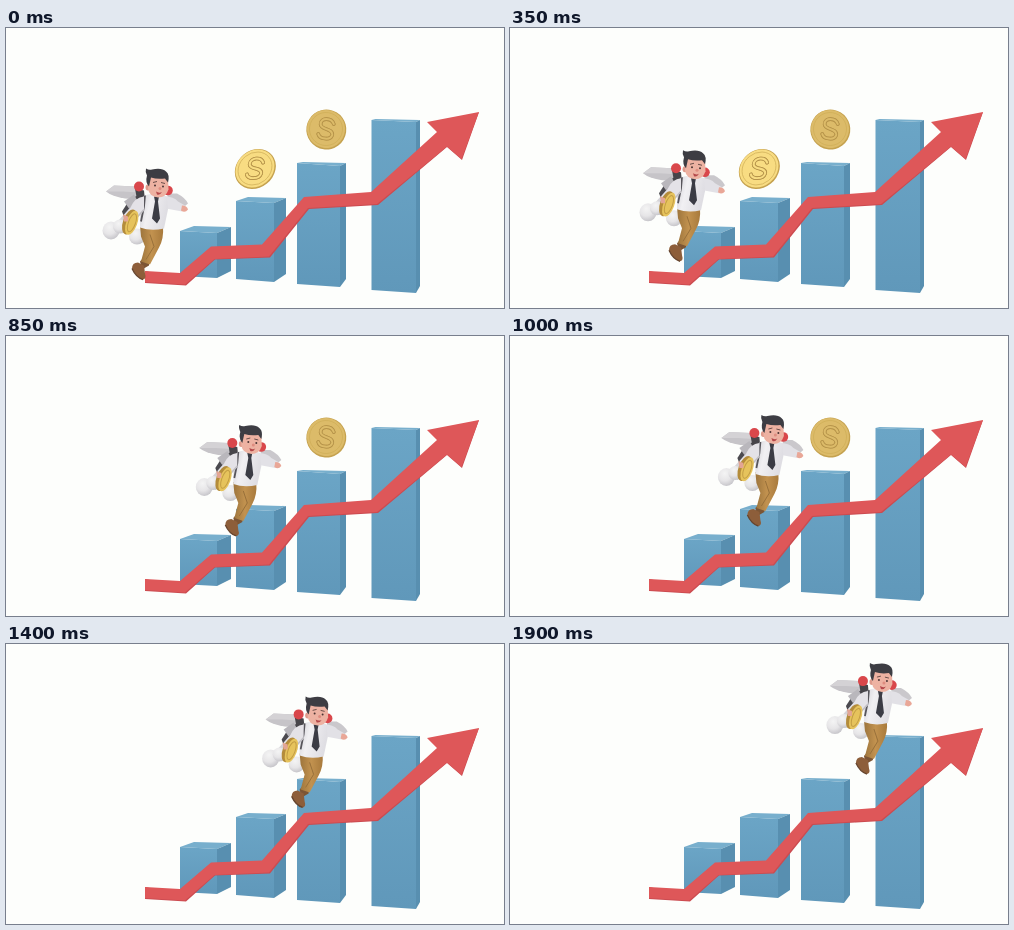
An HTML page that plays this animation: 498 by 280 pixels, repeating every 1950 ms.

```html
<!DOCTYPE html>
<html lang="en">
<head>
<meta charset="utf-8">
<title>Climbing the chart</title>
<style>
  html, body { margin: 0; width: 100%; height: 100%; overflow: hidden; background: #fdfefc; }
  svg { display: block; width: 498px; height: 280px; }
</style>
</head>
<body>
<svg viewBox="0 0 498 280">
  <defs>
    <linearGradient id="front" x2="0" y2="1">
      <stop stop-color="#6ba5c6"/><stop offset="1" stop-color="#6098ba"/>
    </linearGradient>
    <radialGradient id="puff" cx=".4" cy=".3" r=".75">
      <stop stop-color="#f4f4f4"/><stop offset=".55" stop-color="#e6e5e7"/><stop offset="1" stop-color="#c2c1c6"/>
    </radialGradient>
    <linearGradient id="shirt" x2="1" y2=".3">
      <stop stop-color="#cfced4"/><stop offset=".4" stop-color="#f1f0f3"/><stop offset="1" stop-color="#dfdee3"/>
    </linearGradient>
    <linearGradient id="pants" x2="1">
      <stop stop-color="#9c743c"/><stop offset=".5" stop-color="#c2924f"/><stop offset="1" stop-color="#a87a3c"/>
    </linearGradient>
    <g id="coin">
      <circle cx=".4" cy=".5" r="20" fill="#c5a24f"/>
      <circle r="19" fill="currentColor"/>
      <circle r="16.500" fill="none" stroke="#cfae58" stroke-width=".7"/>
      <g fill="none" stroke-linecap="round">
        <path id="ess" d="M7-6C4-12-7-11-6-4C-5 2 7-2 7 5C6 11-5 11-7 6" stroke="#b6944a" stroke-width="3.600"/>
        <use href="#ess"/>
        <path d="M7-6C4-12-7-11-6-4C-5 2 7-2 7 5C6 11-5 11-7 6" stroke="currentColor" stroke-width="2"/>
      </g>
    </g>
  </defs>

  <g id="bars"></g>

  <path d="M139 243L139 255L180 257.500L209 231.500L264 229.500L303 181L372 177L441 119L456 132L473 84L440 112L366 172L299 176L260 223L206 226L176 251Z" fill="#cb4b50"/>
  <path d="M139 243L174 245L205 218.500L256 216.500L298 169L365 164L431 104L421 94L473 84L455.500 131L441 118.500L371 176L302 180L263 228.500L208.500 231L179 256.500L139 254Z" fill="#de5759"/>

  <use id="coinA" href="#coin" color="#f8dc82" transform="translate(249 140.500) rotate(-40) scale(1.090 .930) rotate(46)"/>
  <use id="coinB" href="#coin" color="#dcbb69" transform="translate(320 101) rotate(8)"/>

  <g id="man">
    <!-- wings, pack and smoke -->
    <path d="M-51 10L-43 4L-22 5L-15 18L-32 17Q-45 15-51 10Z" fill="#c6c4c8"/>
    <path d="M-51 10L-43 4L-22 5L-19 11L-34 10Z" fill="#d4d2d5"/>
    <path d="M10 12L20 12Q28 16 31 22L25 27L12 25Z" fill="#cac8cc"/>
    <path d="M-27 26L-19 40L-35 52L-42 43Z" fill="#d5d4d8"/>
    <path d="M-35 30L-28 19L-18 13L-16 24L-24 36L-32 38Z" fill="#4b4a4f"/>
    <path d="M-33 20L-23 13L-19 20L-28 27Z" fill="#b9b7bc"/>
    <ellipse cx="-46" cy="49" rx="8.500" ry="9" fill="url(#puff)"/>
    <circle cx="-37" cy="45" r="7" fill="url(#puff)"/>
    <circle cx="-20" cy="55" r="8" fill="url(#puff)"/>
    <path d="M-22 7L-13 9L-12 20L-20 18Z" fill="#47454a"/>
    <circle cx="-18" cy="5" r="5" fill="#d9474b"/>
    <circle cx="11" cy="9" r="4.800" fill="#d9474b"/>

    <!-- legs and shoes -->
    <path d="M-8 70L-17 80L-15 88L-8 84Z" fill="#7c5534"/>
    <path d="M-17 44L6 45Q7 57 2 66L-7 83L-16 80L-12 65L-16 55Z" fill="url(#pants)"/>
    <path d="M-7 53L-3 65L-11 78" fill="none" stroke="#98703a" stroke-width="1"/>
    <path d="M-19 81Q-25 81-25 87Q-21 95-15 98Q-10 98-12 92L-13 84Z" fill="#8d5e3a"/>
    <path d="M-25 87Q-21 96-14 98" fill="none" stroke="#65442e" stroke-width="1.300"/>

    <!-- shirt, arms and tie -->
    <path d="M7 15Q17 15 21 20L28 24L25 30L9 27Z" fill="#e2e1e6"/>
    <path d="M25 24Q30 24 31 28Q28 32 24 29Z" fill="#e9a797"/>
    <path d="M-13 14Q-1 10 10 15L11 28L7 47Q-6 50-17 46L-17 27Z" fill="url(#shirt)"/>
    <path d="M-12 14L-13 25L-16 40" fill="none" stroke="#57555b" stroke-width="1.800"/>
    <path d="M-3 15L2 15L1 20L3 37L0 42L-5 37L-2 20Z" fill="#3b3c45"/>
    <path d="M-13 15Q-22 16-26 25L-33 33L-30 41L-21 38L-13 29Z" fill="#e4e2e7"/>
    <path d="M-13 28L-21 37" stroke="#c0bec4" stroke-width="1.500"/>
    <g transform="translate(-26 41) rotate(20)">
      <ellipse cx="-1.500" rx="6.500" ry="13" fill="#b48c3b"/>
      <ellipse cx=".8" rx="5.500" ry="12.500" fill="#e6c35c"/>
      <ellipse cx="1" rx="3.500" ry="9.500" fill="none" stroke="#c39d44"/>
    </g>
    <path d="M-34 33L-29 35L-29 40L-33 40Z" fill="#e3a594"/>

    <!-- head -->
    <ellipse cx="-9" cy="6" rx="2.500" ry="3" fill="#de9a8b"/>
    <path d="M-9-4Q0-9 11-3L11.500 8Q9 16 1 16Q-8 15-9 7Z" fill="#edb2a2"/>
    <path d="M-11-13Q-8-11-5-12Q5-14 9-10Q13-7 11 1L8-3Q0-2-6-4L-8 5Q-12 1-10-6Q-12-10-11-13Z" fill="#3d3d43"/>
    <g fill="#4b3534">
      <circle cx="-2" cy="4" r="1"/><circle cx="6" cy="5" r="1"/>
      <path d="M-4 1L0 0M4 1L8 2" stroke="#4b3534" stroke-width=".8"/>
    </g>
    <circle cx="3" cy="7" r="1.500" fill="#de8d80"/>
    <path d="M-1 10Q2 12 5 10.500Q3 14 0 13Z" fill="#b5484a"/>
  </g>
</svg>
<script>
const LOOP = 1950, STEP = 50;
const $ = id => document.getElementById(id);

// left, front right, right, top back, top left, top front, bottom left, bottom front, bottom right
const bars = [
  [174, 211, 225, 198, 203, 205, 248, 250, 243],
  [230, 268, 280, 169, 173, 175, 251, 254, 246],
  [291, 334, 340, 134, 135, 138, 256, 259, 251],
  [365.5, 410, 414, 91, 92, 94, 262, 265, 258]
];
const face = (points, fill) => `<polygon points="${points}" fill="${fill}"/>`;
$("bars").innerHTML = bars.map(([l, m, r, back, left, front, bl, bf, br]) =>
  face([l, left, l + r - m, back, r, back + 1, m, front], "#78afcd") +
  face([l, left, m, front, m, bf, l, bl], "url(#front)") +
  face([m, front, r, back + 1, r, br, m, bf], "#588fb0")
).join("");

// Speeds up to a steady climb along a straight line.
const RAMP = 350, START_SPEED = 0.068, SPEED = 0.1206;
function distance(t) {
  const s = Math.min(t, RAMP);
  return START_SPEED * s + (SPEED - START_SPEED) * s * s / (2 * RAMP) + SPEED * Math.max(0, t - RAMP);
}

function draw(now) {
  const t = Math.floor(now % LOOP / STEP) * STEP;
  const d = distance(t);
  $("man").setAttribute("transform", `translate(${151 + d} ${153.5 - d * 0.552})`);
  $("coinA").style.display = t < 500 ? "" : "none";
  $("coinB").style.display = t < 1050 ? "" : "none";
}

const began = performance.now();
function tick() {
  draw(performance.now() - began);
  requestAnimationFrame(tick);
}
tick();
</script>
</body>
</html>
```
